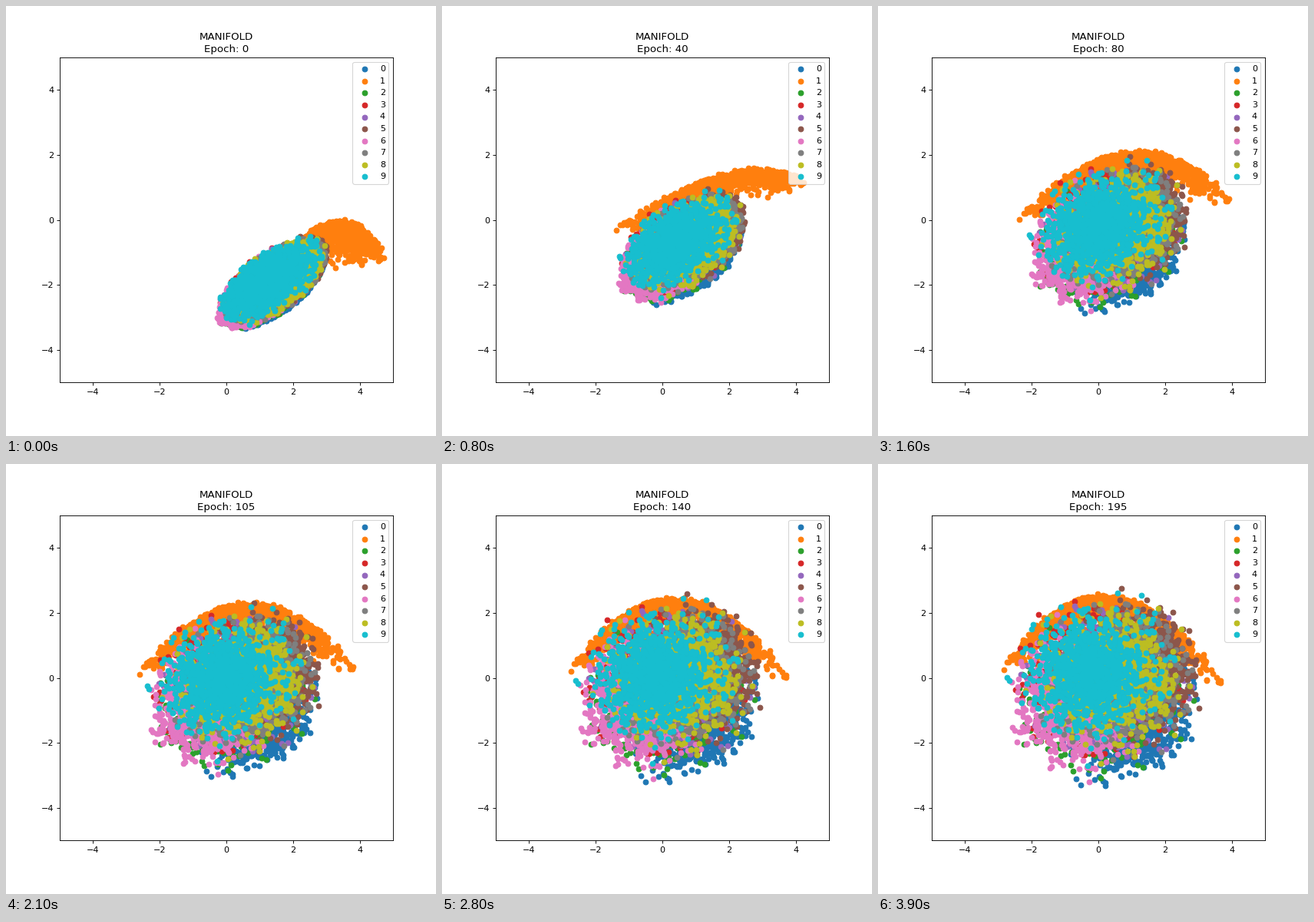
Animation, 560 px wide and 560 px high, one loop 4 s. Source, as a matplotlib script:

```python
import numpy as np
import matplotlib.pyplot as plt
from matplotlib.animation import FuncAnimation

FRAMES = 40
COUNT = 1000
SPREAD = 0.82
rng = np.random.default_rng(11)

# Settled centre of each round class; class 1 is an arc instead.
CENTRES = {
    0: (0.9, -1.2), 2: (0.0, -0.6), 3: (-0.2, -0.1),
    4: (0.2, -0.1), 5: (1.2, 0.3), 6: (-0.6, -0.8),
    7: (0.6, 0.1), 8: (0.4, 0.1), 9: (-0.2, 0.2),
}
DRIFT = np.array([1.35, -1.9])
MIDDLE = np.array([0.1, -0.3])

# Control points of the arc's edge: early, halfway, settled.
ARC_PATH = np.array([
    [(2.2, -0.6), (3.9, 0.8), (4.8, -1.3)],
    [(-1.65, -0.6), (4.0, 0.95), (4.6, 3.0)],
    [(-2.95, 0.2), (0.2, 5.15), (3.9, -0.4)],
])

tilt = np.radians(38)
turn = np.array([[np.cos(tilt), -np.sin(tilt)], [np.sin(tilt), np.cos(tilt)]])
SQUEEZE = turn @ np.diag([0.95, 0.45]) @ turn.T


def bezier(p0, p1, p2, t):
    return (1 - t) ** 2 * p0 + 2 * t * (1 - t) * p1 + t ** 2 * p2


def length(v):
    return np.hypot(v[:, 0], v[:, 1])[:, None]


def progress(i):
    return (1 - np.exp(-i / 8.7)) / (1 - np.exp(-(FRAMES - 1) / 8.7))


def make_cloud(centre):
    v = centre + rng.normal(0, SPREAD, (COUNT, 2)) - MIDDLE
    return MIDDLE + v / (1 + (length(v) / 3.3) ** 6) ** (1 / 6)


clouds = {k: make_cloud(c) for k, c in CENTRES.items()}
arc_pos = rng.beta(1.9, 2.1, (COUNT, 1))
arc_depth = np.abs(rng.normal(size=(COUNT, 1)))
arc_noise = rng.normal(0, 0.03, (COUNT, 2))


def arc_points(s):
    edge = bezier(*bezier(*ARC_PATH, s), arc_pos)
    inward = MIDDLE + (1 - s) * DRIFT - edge
    depth = arc_depth * (0.55 - 0.25 * s)
    return edge + inward / length(inward) * depth + arc_noise


def cloud_points(p, s):
    """Drift to the middle while the flat cloud opens into a disc."""
    r = length(p)
    flat = (p / r * 2.3 * np.tanh(r / 2)) @ SQUEEZE
    opened = s ** 3
    return (1 - s) * DRIFT + (1 - opened) * flat + opened * p


def class_points(k, s):
    return arc_points(s) if k == 1 else cloud_points(clouds[k], s)


fig = plt.figure(figsize=(7, 7), dpi=80)
ax = fig.add_axes([0.125, 0.125, 0.775, 0.755])
ax.set(xlim=(-5, 5), ylim=(-5, 5),
       xticks=range(-4, 5, 2), yticks=range(-4, 5, 2))
dots = [ax.scatter(*class_points(k, 0).T, color=f"C{k}", label=str(k))
        for k in range(10)]
ax.legend(loc="upper right")
title = ax.set_title("MANIFOLD\nEpoch: 0", pad=6.8, linespacing=1.28)


def update(i):
    s = progress(i)
    for k, dot in enumerate(dots):
        dot.set_offsets(class_points(k, s))
    title.set_text(f"MANIFOLD\nEpoch: {5 * i}")
    return [*dots, title]


anim = FuncAnimation(fig, update, frames=FRAMES, interval=100,
                     repeat=True, repeat_delay=0, blit=False)
plt.show()
```
